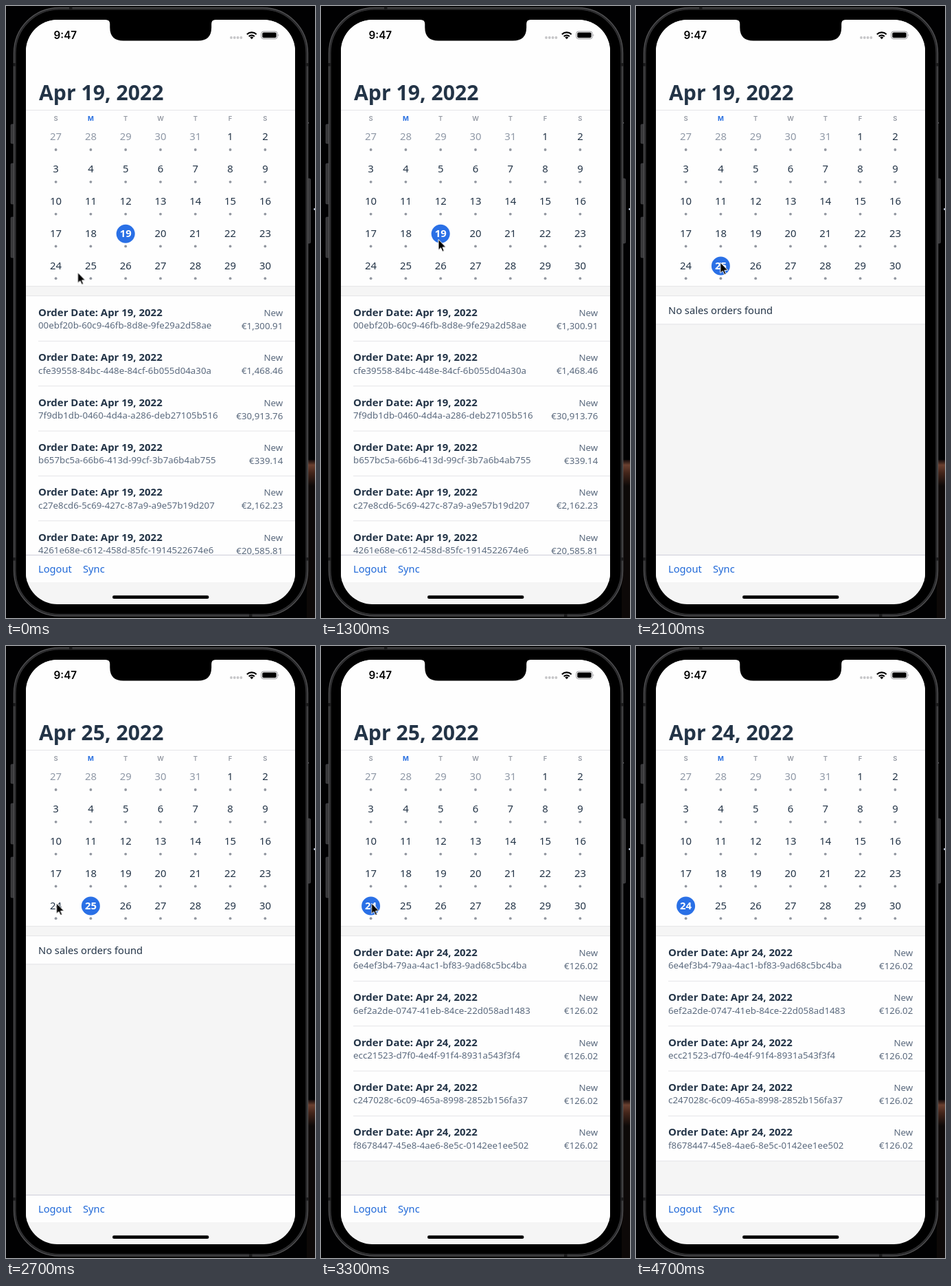
These frames come from a looping animation (450x890 px, 5 s). An HTML page:

```html
<!DOCTYPE html>
<html lang="en">
<head>
<meta charset="utf-8">
<title>Orders calendar</title>
<style>
  html, body { margin: 0; width: 100%; height: 100%; overflow: hidden; background: #000; }
  svg { display: block; width: 100vw; height: 100vh; }
  text { font-family: "Noto Sans", "Open Sans", sans-serif; fill: #233447; }
  .clock { font: 600 15.3px Inter, sans-serif; fill: #000; }
  .title { font-size: 30.2px; font-weight: 900; }
  .weekday { font: 600 9.5px Inter, sans-serif; fill: #9499a3; text-anchor: middle; }
  .weekday.today { font-weight: 700; fill: #2a70e0; }
  .day { font-size: 14.9px; text-anchor: middle; }
  .other { fill: #8f98a6; }
  .picked { font-weight: 700; fill: #fff; }
  .order { font-size: 14.95px; font-weight: 700; }
  .detail { font-size: 13.3px; fill: #5b6a7e; }
  .right { text-anchor: end; }
  .note { font-size: 14.7px; }
  .link { font-size: 14.7px; fill: #1f68d8; }
</style>
</head>
<body>
<svg viewBox="0 0 450 890" preserveAspectRatio="none">
  <defs>
    <clipPath id="screen"><rect x="29" y="20" width="392" height="850" rx="46"/></clipPath>
    <clipPath id="listArea"><rect x="29" y="422" width="392" height="376"/></clipPath>
    <linearGradient id="glow" x1="0" y1="0" x2="0" y2="1">
      <stop offset="0" stop-color="#120a0a"/>
      <stop offset=".2" stop-color="#6b4030"/>
      <stop offset=".5" stop-color="#44251a"/>
      <stop offset="1" stop-color="#0d0908"/>
    </linearGradient>
  </defs>

  <!-- wallpaper -->
  <rect width="450" height="890" fill="#010102"/>
  <rect x="438" y="696" width="12" height="194" fill="#0d0908"/>
  <rect x="438" y="660" width="12" height="38" fill="url(#glow)"/>
  <circle cx="449.5" cy="295.5" r="1.4" fill="#c8d2e6"/>
  <circle cx="440.5" cy="170" r=".8" fill="#77777c"/>

  <!-- phone body -->
  <g fill="#38383a" stroke="#505052" stroke-width=".6">
    <rect x="7" y="172" width="5" height="28" rx="1.5"/>
    <rect x="7" y="229" width="5" height="59" rx="1.5"/>
    <rect x="7" y="307" width="5" height="59" rx="1.5"/>
    <rect x="438.5" y="251" width="5" height="94" rx="1.5"/>
  </g>
  <rect x="11.5" y="2.5" width="428" height="884.5" rx="66" fill="#262628" stroke="#505052" stroke-width="1.4"/>
  <rect x="14" y="5" width="423" height="879.5" rx="63.5" fill="#000" stroke="#343436" stroke-width="1.2"/>
  <g fill="#1b1b1c">
    <rect x="92" y="2" width="4.5" height="4"/>
    <rect x="354" y="884" width="4.5" height="4"/>
    <rect x="11" y="83" width="4" height="4.5"/>
    <rect x="436.5" y="83" width="4" height="4.5"/>
    <rect x="11" y="802" width="4" height="4.5"/>
    <rect x="436.5" y="802" width="4" height="4.5"/>
  </g>

  <g clip-path="url(#screen)">
    <rect x="29" y="20" width="392" height="850" fill="#f5f5f5"/>
    <rect x="29" y="20" width="392" height="387.5" fill="#fefefe"/>
    <path d="M29 151.5H421M29 407.5H421M29 421.5H421" stroke="#e6e6e8"/>
    <text class="clock" x="69.5" y="47.8">9:47</text>
    <g id="titles"></g>
    <g id="calendar"></g>
    <g id="lists" clip-path="url(#listArea)"></g>
    <rect x="29" y="798" width="392" height="40" fill="#fefefe"/>
    <path d="M29 798.5H421" stroke="#cdcdd9"/>
    <text class="link" x="47" y="823.8">Logout</text>
    <text class="link" x="112" y="823.8">Sync</text>
    <rect x="155" y="857.3" width="140.5" height="4.8" rx="2.4"/>
  </g>
  <path d="M145 19H305V20Q299.2 20 299.2 26V31Q299.2 50.6 279.5 50.6H171Q151.3 50.6 151.3 31V26Q151.3 20 145 20Z"/>

  <!-- status icons -->
  <g fill="#c6c6c8">
    <circle cx="328" cy="46" r="1.9"/><circle cx="332.8" cy="46" r="1.9"/>
    <circle cx="337.6" cy="46" r="1.9"/><circle cx="342.4" cy="46" r="1.9"/>
  </g>
  <g fill="none" stroke="#000" stroke-width="2.2">
    <path d="M350.9 41.2A10 10 0 0 1 364.7 41.2"/>
    <path d="M353.7 44.2A6 6 0 0 1 361.9 44.2"/>
  </g>
  <path d="M357.8 48.2L355.3 45.7A3.6 3.6 0 0 1 360.3 45.7Z"/>
  <rect x="371.7" y="37" width="23.6" height="10.8" rx="3.3" fill="none" stroke="#98989b"/>
  <rect x="373.3" y="38.6" width="20.4" height="7.6" rx="1.9"/>
  <path d="M396.5 40.5Q398.2 42.4 396.5 44.3Z" fill="#98989b"/>

  <path id="cursor" d="M0 0V15.4L3.5 12.2L5.9 17.6L8.3 16.6L6 11.3H10.9Z" stroke="#fff" stroke-width="1" stroke-linejoin="round"/>
</svg>
<script>
const LOOP = 5000;
const ROW = 65.35;
const $ = id => document.getElementById(id);

function add(parent, tag, attrs = {}, content = '') {
  const node = document.createElementNS('http://www.w3.org/2000/svg', tag);
  for (const key in attrs) node.setAttribute(key, attrs[key]);
  node.textContent = content;
  return parent.appendChild(node);
}
const label = (parent, cls, x, y, content) => add(parent, 'text', { class: cls, x, y }, content);

// Holds each value until the next step.
function play(node, prop, steps) {
  const frames = steps.map(([time, value]) =>
    ({ offset: time / LOOP, [prop]: value, easing: 'steps(1, end)' }));
  frames.push({ offset: 1, [prop]: steps.at(-1)[1] });
  node.animate(frames, { duration: LOOP, iterations: Infinity });
}
function showBetween(node, from, to) {
  const steps = [[from, 1]];
  if (from > 0) steps.unshift([0, 0]);
  if (to < LOOP) steps.push([to, 0]);
  play(node, 'opacity', steps);
}

// Titles
[[19, 0, 2700], [25, 2700, 3700], [24, 3700, LOOP]].forEach(([day, from, to]) =>
  showBetween(label($('titles'), 'title', 48, 136.5, `Apr ${day}, 2022`), from, to));

// Calendar
const calendar = $('calendar');
const cellX = i => 72.6 + 50.8 * (i % 7);
const cellY = i => 190 + 46.8 * Math.floor(i / 7);
const LEAD = 5;
[...'SMTWTFS'].forEach((letter, i) =>
  label(calendar, i === 1 ? 'weekday today' : 'weekday', cellX(i), 166.8, letter));
for (let i = 0; i < 35; i++) {
  const outside = i < LEAD;
  label(calendar, outside ? 'day other' : 'day', cellX(i), cellY(i) + 5.3, outside ? 27 + i : i - LEAD + 1);
  add(calendar, 'circle', { cx: cellX(i), cy: cellY(i) + 19, r: 1.9, fill: '#9297a0' });
}
[[19, 0, 1900], [25, 1900, 2900], [24, 2900, LOOP]].forEach(([day, from, to]) => {
  const i = day + LEAD - 1;
  const group = add(calendar, 'g');
  add(group, 'circle', { cx: cellX(i), cy: cellY(i) + 0.8, r: 13.5, fill: '#2a70e6' });
  label(group, 'day picked', cellX(i), cellY(i) + 5.3, day);
  showBetween(group, from, to);
});

// Order lists
function panel(height) {
  const group = add($('lists'), 'g');
  add(group, 'rect', { x: 29, y: 422, width: 392, height, fill: '#fefefe' });
  add(group, 'path', { d: `M29 ${422.3 + height}H421`, stroke: '#e3e3e6' });
  return group;
}
function orderList(day, orders) {
  const group = panel(orders.length * ROW);
  orders.forEach(([id, price], i) => {
    const y = 450.8 + i * ROW;
    label(group, 'order', 47, y, `Order Date: Apr ${day}, 2022`);
    label(group, 'detail', 47, y + 18.6, id);
    label(group, 'detail right', 403.3, y + 0.2, 'New');
    label(group, 'detail right', 403.3, y + 19, '€' + price);
    if (i) add(group, 'path', { d: `M47 ${422 + i * ROW}H421`, stroke: '#e5e5e8' });
  });
  return group;
}
showBetween(orderList(19, [
  ['00ebf20b-60c9-46fb-8d8e-9fe29a2d58ae', '1,300.91'],
  ['cfe39558-84bc-448e-84cf-6b055d04a30a', '1,468.46'],
  ['7f9db1db-0460-4d4a-a286-deb27105b516', '30,913.76'],
  ['b657bc5a-66b6-413d-99cf-3b7a6b4ab755', '339.14'],
  ['c27e8cd6-5c69-427c-87a9-a9e57b19d207', '2,162.23'],
  ['4261e68e-c612-458d-85fc-1914522674e6', '20,585.81'],
]), 0, 2100);

const empty = panel(40.5);
label(empty, 'note', 47, 448, 'No sales orders found');
showBetween(empty, 2100, 2900);

showBetween(orderList(24, [
  '6e4ef3b4-79aa-4ac1-bf83-9ad68c5bc4ba',
  '6ef2a2de-0747-41eb-84ce-22d058ad1483',
  'ecc21523-d7f0-4e4f-91f4-8931a543f3f4',
  'c247028c-6c09-465a-8998-2852b156fa37',
  'f8678447-45e8-4ae6-8e5c-0142ee1ee502',
].map(id => [id, '126.02'])), 2900, LOOP);

// Pointer
play($('cursor'), 'transform', [
  [0, 104.5, 387.5], [100, 171.5, 386], [300, 171, 345], [500, 171, 339.5],
  [1500, 125.5, 369], [1700, 122.8, 373], [2300, 86, 373], [2500, 74, 373.5],
  [2700, 73.5, 374], [3500, 67, 235], [3700, 62, 40.5],
].map(([time, x, y]) => [time, `translate(${x}px, ${y}px)`]));
showBetween($('cursor'), 0, 4100);
</script>
</body>
</html>
```
